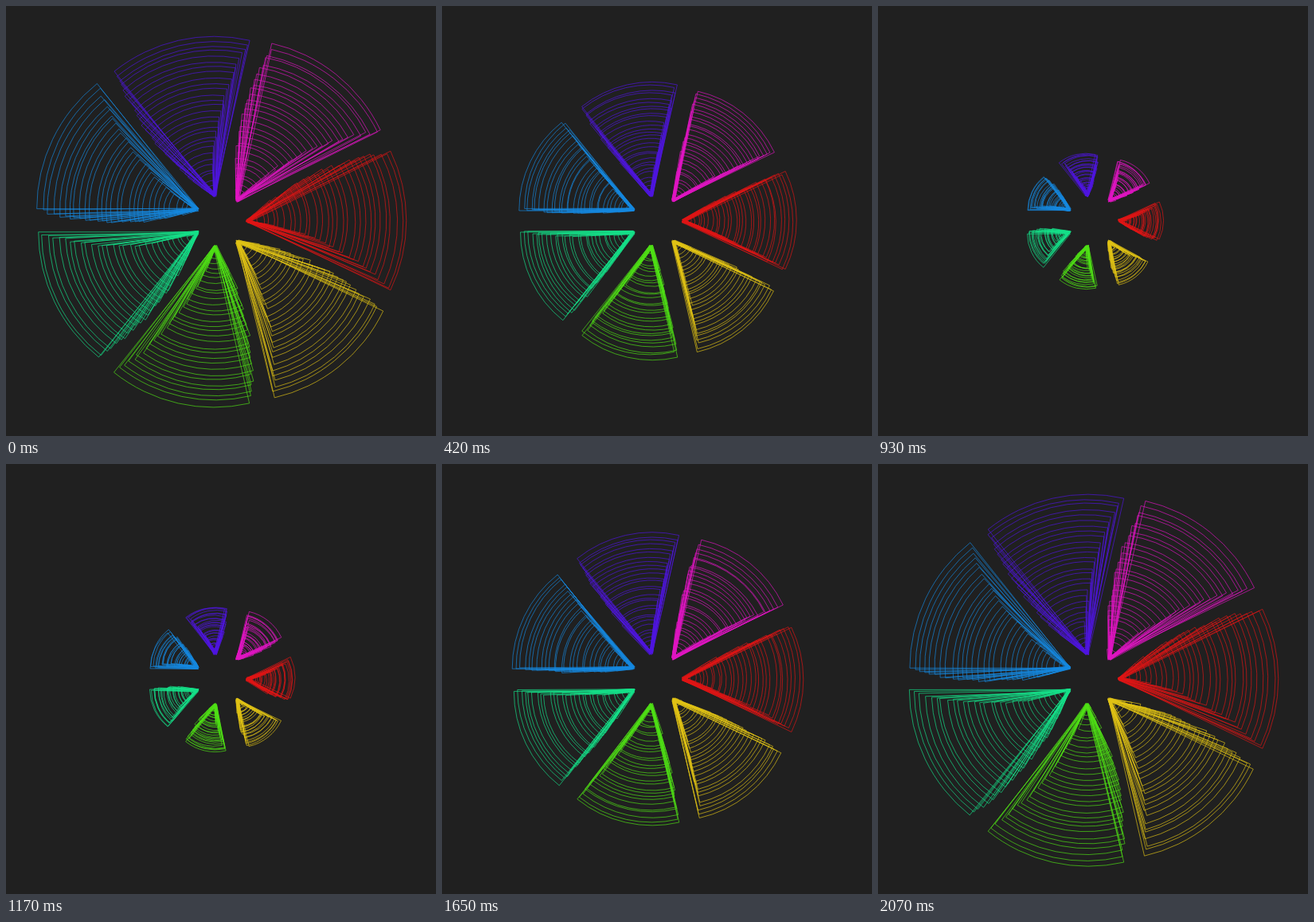
An HTML page that plays this animation: 540 by 540 pixels, repeating every 2.1 s.

```html
<!DOCTYPE html>
<html lang="en">
<head>
<meta charset="utf-8">
<title>Breathing colour wheel</title>
<style>
  html, body { margin: 0; width: 100%; height: 100%; overflow: hidden; background: #202020; }
  svg { display: block; width: 100%; height: 100%; }
  path { fill: none; stroke-width: .75; stroke-opacity: .9; }
</style>
</head>
<body>
<svg viewBox="0 0 540 540"></svg>
<script>
const LOOP = 2100, STEP = 30;
const SECTORS = 7, RINGS = 30;
const CENTER = 270, GAP = 33;
const SPAN = 2 * Math.PI / SECTORS;
const JITTER = 2;

const svg = document.querySelector('svg');
const sectors = Array.from({ length: SECTORS }, (_, i) => {
  const path = document.createElementNS('http://www.w3.org/2000/svg', 'path');
  path.setAttribute('stroke', `hsl(${i * 360 / SECTORS}, 83%, 48%)`);
  return svg.appendChild(path);
});

function seeded(seed) {
  let a = Math.imul(seed + 1, 0x9e3779b1);
  return () => {
    a = a + 0x6d2b79f5 | 0;
    let n = Math.imul(a ^ a >>> 15, 1 | a);
    n = n + Math.imul(n ^ n >>> 7, 61 | n) ^ n;
    return ((n ^ n >>> 14) >>> 0) / 4294967296;
  };
}

const point = (x, y, r, angle) =>
  `${(x + r * Math.cos(angle)).toFixed(2)} ${(y + r * Math.sin(angle)).toFixed(2)}`;

function pie(x, y, r, angle) {
  const from = point(x, y, r, angle - SPAN / 2);
  const to = point(x, y, r, angle + SPAN / 2);
  return `M${point(x, y, 0, 0)}L${from}A${r} ${r} 0 0 1 ${to}Z`;
}

function render(time) {
  const step = Math.floor(time % LOOP / STEP);
  const random = seeded(step);
  const shake = () => (random() * 2 - 1) * JITTER;
  const wave = Math.cos(2 * Math.PI * (step * STEP + 37) / LOOP);
  const radius = 126.5 + 75 * wave;
  const twist = (2 + 17 * wave) * Math.PI / 180;

  sectors.forEach((path, i) => {
    const angle = i * SPAN;
    const x = CENTER + GAP * Math.cos(angle);
    const y = CENTER + GAP * Math.sin(angle);
    let d = '';
    for (let ring = 1; ring <= RINGS; ring++) {
      const share = ring / RINGS;
      d += pie(x + shake(), y + shake(), radius * share, angle - twist * (1 - share));
    }
    path.setAttribute('d', d);
  });
}

const start = performance.now();
function tick() {
  render(performance.now() - start);
  requestAnimationFrame(tick);
}
tick();
</script>
</body>
</html>
```
